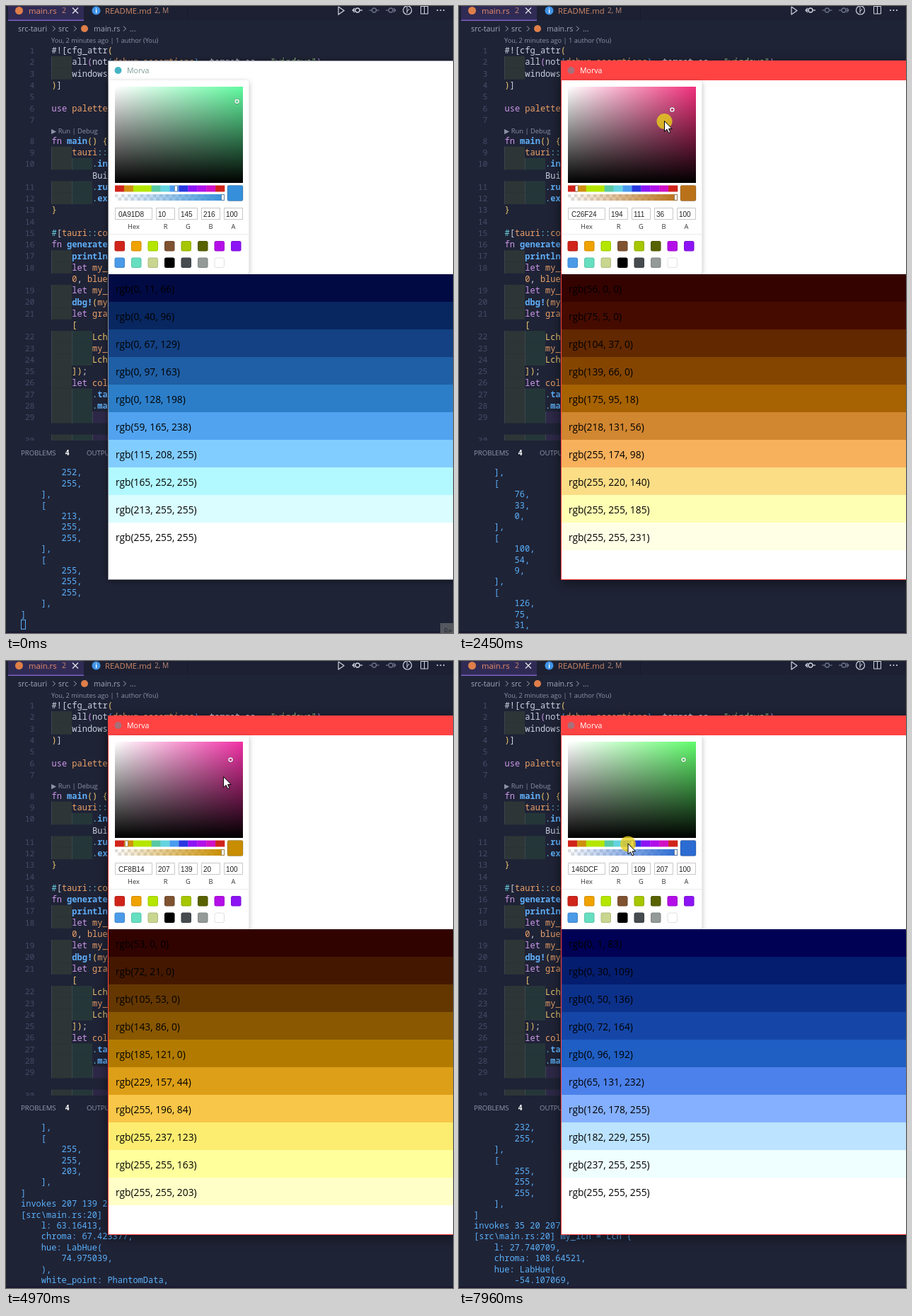
These frames come from a looping animation (632x886 px, 8000 ms). An HTML page with a canvas:

```html
<!DOCTYPE html>
<html lang="en">
<head>
<meta charset="utf-8">
<title>Colour picker demo</title>
<style>
html, body { margin: 0; width: 100%; height: 100%; overflow: hidden; background: #1f2336; }
canvas { display: block; }
</style>
</head>
<body>
<canvas id="stage" width="632" height="886"></canvas>
<script>
const ctx = document.getElementById('stage').getContext('2d');
const LOOP = 8000;
const UI = '"Open Sans", "Noto Sans", sans-serif';
const MONO = '"Noto Sans Mono", "DejaVu Sans Mono", monospace';
const ARIAL = '"Liberation Sans", Arial, sans-serif';
const BG = '#1f2336';

const BLUE = [10, 145, 216], BROWN = [139, 87, 42], ORANGE = [245, 166, 35], GOLD = [207, 139, 20];
const DARK = [99, 68, 43], SAND = [179, 126, 83], RUST = [194, 111, 36], OLIVE = [117, 91, 46];
const VIOLET = [75, 20, 207], INDIGO = [35, 20, 207], AZURE = [20, 109, 207];

// Each scene plays in hard steps, then holds. Pointer path (go) and colours are evenly spaced
// over the scene; lines = log lines printed; press = part of the scene with the button down.
const SCENES = [
  { at: 0, end: 1, steps: 1, go: [[625, 880]], colours: [BLUE], lines: 61 },
  { at: 70, end: 580, steps: 8, go: [[237, 341]], colours: [BLUE], lines: 0 },
  { at: 980, end: 1450, steps: 8, go: [[250, 232], [256, 198]], colours: [BROWN], lines: 8, press: .13, swatch: 3, busy: true },
  { at: 1600, end: 2400, steps: 12, go: [[249, 142], [285, 150], [287, 168]], colours: [DARK, SAND, BROWN, RUST], lines: 201, press: 1 },
  { at: 2450, end: 3230, steps: 12, go: [[301, 146], [301, 146], [187, 341]], colours: [RUST], lines: 96, press: .6 },
  { at: 3300, end: 4040, steps: 10, go: [[187, 341], [187, 341], [262, 190]], colours: [ORANGE], lines: 8, press: .1, swatch: 1 },
  { at: 4110, end: 4910, steps: 13, go: [[255, 178], [277, 150], [310, 139], [322, 139]],
    colours: [DARK, OLIVE, [180, 139, 66], GOLD, GOLD], lines: 172, press: 1, lag: 1.75 },
  { at: 4970, end: 5590, steps: 10, go: [[250, 262], [250, 270]], colours: [GOLD], lines: 108 },
  { at: 5860, end: 6620, steps: 11, go: [[244, 270], [242, 270]], colours: [GOLD], lines: 121, press: 1 },
  { at: 6690, end: 7360, steps: 11, go: [[290, 270], [268, 261]], colours: [GOLD], lines: 150, press: .5 },
  { at: 7560, end: 7960, steps: 6, go: [[250, 259], [239, 258]], colours: [VIOLET, INDIGO, AZURE], lines: 57, press: 1 }
];
SCENES.forEach((s, i) => {
  const last = SCENES[i - 1];
  s.path = last ? [last.go.at(-1), ...s.go] : s.go;
  s.firstLine = last ? last.firstLine + last.lines : 0;
});
const CALLS = [BLUE, BROWN, DARK, SAND, BROWN, RUST, ORANGE, OLIVE, ...Array(7).fill(GOLD), VIOLET, INDIGO];
const CALL_LINES = 61;

// Point at progress p along evenly spaced values
function along(list, p) {
  const f = Math.max(0, Math.min(1, p)) * (list.length - 1), i = Math.floor(f);
  const a = list[i], b = list[i + 1] || a;
  return a.map((x, j) => x + (b[j] - x) * (f - i));
}

function stateAt(t) {
  const scene = SCENES.findLast(s => t >= s.at);
  const { at, end, steps, lag = 0, press = 0 } = scene;
  const p = Math.min(1, (Math.floor((t - at) / (end - at) * (steps - 1) + 1e-6) + 1) / steps);
  const colourAt = q => along(scene.colours, q).map(Math.round);
  return {
    p, scene, index: SCENES.indexOf(scene),
    pointer: along(scene.path, p),
    colour: colourAt(p),
    base: colourAt(p - lag / steps),
    lines: Math.round(scene.firstLine + scene.lines * p),
    pressed: p <= press
  };
}

// Colour maths
const toLinear = c => (c /= 255) <= .04045 ? c / 12.92 : ((c + .055) / 1.055) ** 2.4;
const toByte = c => {
  const s = c <= .0031308 ? c * 12.92 : 1.055 * c ** (1 / 2.4) - .055;
  return Math.floor(Math.max(0, Math.min(1, s)) * 255 + 1e-6);
};
const labCurve = x => x > .008856 ? Math.cbrt(x) : 7.787 * x + 16 / 116;
const labInverse = x => x > .20690 ? x ** 3 : (x - 16 / 116) / 7.787;

function toLab(rgb) {
  const [r, g, b] = rgb.map(toLinear);
  const x = labCurve((.41246 * r + .35758 * g + .18044 * b) / .95047);
  const y = labCurve(.21267 * r + .71515 * g + .07218 * b);
  const z = labCurve((.01933 * r + .11919 * g + .95030 * b) / 1.08883);
  return [116 * y - 16, 500 * (x - y), 200 * (y - z)];
}

function fromLab(l, a, b) {
  const f = (l + 16) / 116;
  const x = .95047 * labInverse(f + a / 500), y = labInverse(f), z = 1.08883 * labInverse(f - b / 200);
  return [3.24045 * x - 1.53714 * y - .49853 * z,
    -.96927 * x + 1.87601 * y + .04156 * z,
    .05564 * x - .20403 * y + 1.05723 * z].map(toByte);
}

// Ten shades: lightness 0 to the colour's own, then on to 128
function shades(rgb) {
  const [l, a, b] = toLab(rgb);
  return Array.from({ length: 10 }, (_, i) => {
    const p = i / 9 * 2;
    return fromLab(p < 1 ? l * p : l + (128 - l) * (p - 1), a, b);
  });
}

function hsv([r, g, b]) {
  const max = Math.max(r, g, b), d = max - Math.min(r, g, b);
  const h = max === r ? (g - b) / d : max === g ? 2 + (b - r) / d : 4 + (r - g) / d;
  return [(h * 60 + 360) % 360, d / max, max / 255];
}
const pureHue = h => [0, 240, 120].map(o =>
  255 * Math.max(0, Math.min(1, Math.abs((h + 360 - o) % 360 - 180) / 60 - 1)));

const css = c => `rgb(${c.join(', ')})`;

// How the wide-gamut screen renders a colour
function onScreen(rgb) {
  const [r, g, b] = rgb.map(toLinear);
  return [.88 * r + .12 * g, .03 * r + .97 * g, 1.05 * b - .05 * g].map(toByte);
}

function callLog(rgb) {
  const [l, a, b] = toLab(rgb), num = x => +x.toPrecision(8);
  const out = ['invokes ' + rgb.join(' '), '[src\\main.rs:20] my_lch = Lch {',
    `    l: ${num(l)},`, `    chroma: ${num(Math.hypot(a, b))},`, '    hue: LabHue(',
    `        ${num(Math.atan2(b, a) * 180 / Math.PI)},`, '    ),', '    white_point: PhantomData,',
    '}', '[src\\main.rs:33] &colors = ['];
  for (const s of shades(rgb)) out.push('    [', ...s.map(n => `        ${n},`), '    ],');
  return out.concat(']');
}
const logLines = CALLS.flatMap(callLog);

// Drawing helpers
function rect(x, y, w, h, fill) { ctx.fillStyle = fill; ctx.fillRect(x, y, w, h); }
function text(s, x, y, font, fill, align = 'left') {
  ctx.font = font; ctx.fillStyle = fill; ctx.textAlign = align; ctx.textBaseline = 'alphabetic';
  const size = parseFloat(font.match(/[\d.]+(?=px)/)[0]);
  ctx.fillText(s, x, Math.round(y + .37 * size));
}
function disc(x, y, r, fill) { ctx.fillStyle = fill; ctx.beginPath(); ctx.arc(x, y, r, 0, 7); ctx.fill(); }
function ring(x, y, r, stroke, w) {
  ctx.strokeStyle = stroke; ctx.lineWidth = w; ctx.beginPath(); ctx.arc(x, y, r, 0, 7); ctx.stroke();
}
function line(points, stroke, w = 1) {
  ctx.strokeStyle = stroke; ctx.lineWidth = w; ctx.beginPath();
  points.forEach(([x, y]) => ctx.lineTo(x, y)); ctx.stroke();
}
function rounded(x, y, w, h, r, fill, stroke) {
  ctx.beginPath(); ctx.roundRect(x, y, w, h, r);
  if (fill) { ctx.fillStyle = fill; ctx.fill(); }
  if (stroke) { ctx.strokeStyle = stroke; ctx.lineWidth = 1; ctx.stroke(); }
}
function sweep(x0, y0, x1, y1, from, to) {
  const g = ctx.createLinearGradient(x0, y0, x1, y1);
  g.addColorStop(0, from); g.addColorStop(1, to);
  return g;
}

const INK = { w: '#ccd2e0', p: '#cc98ea', b: '#60b0fa', B: '#60b0fa', o: '#eda268', y: '#eeca70', c: '#68cede', g: '#a5d08f' };
// line number | indent | text with ~colour marks; rows without a number are wrapped
const CODE = [
  '1|0|~w#![cfg_attr~y(', '2|1|~wall~p(~wnot~b(~odebug_assertions~b)~w, target_os = ~g"windows"~p)',
  '3|1|~wwindows_subsystem', '4|0|~y)~w]', '5|0|', '6|0|~puse ~opalette', '7|0|',
  '8|0|~pfn ~Bmain~y() {', '9|1|~otauri~c::', '10|2|~c.~Binvoke', '|2|~wBuild',
  '11|2|~c.~Brun', '12|2|~c.~Bexpect', '13|0|~y}', '14|0|', '15|0|~c#~w[~otauri~c::~ocommand',
  '16|0|~pfn ~Bgenerate', '17|1|~Bprintln!', '18|1|~plet ~omy_rgb', '|1|~o0~w, ~oblue',
  '19|1|~plet ~omy_lch', '20|1|~Bdbg!~y(~omy_lch', '21|1|~plet ~ogradient', '|1|~y[',
  '22|2|~yLch', '23|2|~omy_lch', '24|2|~yLch', '25|1|~y])~w;', '26|1|~plet ~ocolors',
  '27|2|~c.~Btake', '28|2|~c.~Bmap', '29|3|', '|3|', '30|3|'
];
const SHADE = ['#2e3536', '#253639', '#2d2847'];

function drawCode() {
  text('You, 2 minutes ago | 1 author (You)', 64, 49, '9.2px ' + UI, '#8d93a8');
  text('▶ Run | Debug', 64, 176.5, '9.4px ' + UI, '#8d93a8');
  ctx.save();
  ctx.beginPath(); ctx.rect(0, 40, 632, 574); ctx.clip();
  CODE.forEach((row, i) => {
    const [num, indent, body] = row.split('|');
    const y = i < 7 ? 62.6 + i * 16.33 : 190.3 + (i - 7) * 16.28;
    for (let k = 0; num && k < +indent; k++) {
      rect(64 + k * 29, y - 8, 29, 16.4, SHADE[k]);
      rect(64 + k * 29, y - 8, 1, 16.4, '#3b4450');
    }
    text(num, 40.5, y, '11.5px ' + MONO, '#454c68', 'right');
    let x = 64.5 + indent * 28.8;
    for (const part of body.split('~').slice(1)) {
      const s = part.slice(1);
      text(s, x, y, (part[0] === 'B' ? 'bold' : '500') + ' 12px ' + MONO, INK[part[0]]);
      x += s.length * 7.2;
    }
  });
  ctx.restore();
}

function drawHeader() {
  rect(0, 0, 632, 20, '#1c2032');
  rect(3, 0, 107, 20, '#302b55');
  rect(3, 19.5, 107, 1.5, '#7d63c4');
  rect(256, 0, 1, 20, '#171a2a');
  disc(18.5, 6.5, 5.5, '#df7f49');
  text('main.rs', 32, 6.5, '11.3px ' + UI, '#e98d68');
  text('2', 79, 6.5, '10.5px ' + UI, '#c9876f');
  line([[94, 2.5], [102, 10.5]], '#e4e6ee', 1.3);
  line([[102, 2.5], [94, 10.5]], '#e4e6ee', 1.3);
  disc(127.5, 6.5, 6, '#3f93e6');
  text('i', 127.5, 6.5, 'bold 9px ' + UI, '#fff', 'center');
  text('README.md', 140, 6.5, '11.3px ' + UI, '#cd8767');
  text('2, M', 210, 6.5, '10.2px ' + UI, '#b88778');

  const icon = '#d0d4e0', dim = '#6d728a';
  line([[470, 1], [478, 6.5], [470, 12], [470, 1]], icon, 1.2);
  [icon, dim, dim].forEach((c, i) => {
    const x = 497 + i * 23.5;
    ring(x, 6, 3, c, 1.3);
    line([[x - 7, 6], [x - 3, 6]], c, 1.3);
    line([[x + 3, 6], [x + 7, 6]], c, 1.3);
    const d = i - 1;
    if (d) line([[x + 4 * d, 3], [x + 7 * d, 6], [x + 4 * d, 9]], c, 1.2);
  });
  ring(567.5, 6, 6, icon, 1.2);
  line([[567, 1], [567, 10]], icon);
  line([[567, 8], [570, 4]], icon);
  ctx.strokeRect(586.5, .5, 10, 10.5);
  line([[591.5, 0], [591.5, 11]], icon);
  for (let i = 0; i < 3; i++) disc(610 + i * 4.5, 6, 1.1, icon);

  const crumb = '10.7px ' + UI, grey = '#a3a8ba';
  text('src-tauri', 17, 32, crumb, grey);
  text('src', 74, 32, crumb, grey);
  disc(111, 32, 5, '#df7f49');
  text('main.rs', 124, 32, crumb, grey);
  text('...', 175, 32, crumb, grey);
  [66, 96, 166].forEach(x => line([[x, 28.5], [x + 3.5, 32], [x, 35.5]], grey));
}

function drawTerminal(count) {
  rect(0, 614, 632, 272, BG);
  text('PROBLEMS', 21, 631, '9.6px ' + UI, '#9299b0');
  text('4', 86.5, 631.5, 'bold 10px ' + UI, '#fff', 'center');
  text('OUTPUT', 114, 631, '9.6px ' + UI, '#9299b0');
  const idle = count % CALL_LINES === 0;
  logLines.slice(count - (idle ? 14 : 15), count).forEach((s, i) =>
    text(s, 21, 659 + i * 15.4, '500 12px ' + MONO, '#5ab0fa'));
  if (idle) {
    ctx.strokeStyle = '#5ab0fa'; ctx.lineWidth = 1;
    ctx.strokeRect(21.5, 867.5, 6, 13);
  }
  rect(0, 884, 632, 2, '#1a1730');
}

const HUES = '#d0241b #cf9010 #b4e600 #b4e600 #58c8a4 #64d4e0 #4a9bf0 #2838e0 #8c14f4 #b010e8 #d010c4 #d0241b'.split(' ');
const SWATCHES = ('#d0241b #f0a200 #b4e600 #7f5230 #a6c600 #586200 #b40ee8 #8c14f4 ' +
  '#4a9ae8 #66dfc0 #c8d690 #000000 #464b4f #939a97 #ffffff').split(' ');

function drawPicker(rgb, focus) {
  const [h, s, val] = hsv(rgb), shown = onScreen(rgb), color = css(shown);
  ctx.save();
  ctx.shadowColor = 'rgba(0,0,0,.28)'; ctx.shadowBlur = 7; ctx.shadowOffsetY = 2;
  rounded(145, 105, 198.5, 274, 4, '#fff');
  ctx.restore();

  rect(154, 114, 181, 136, sweep(154, 0, 335, 0, '#fff', css(onScreen(pureHue(h)))));
  rect(154, 114, 181, 136, sweep(0, 114, 0, 250, 'rgba(0,0,0,0)', '#000'));
  const hx = 154 + 181 * s, hy = 114 + 136 * (1 - val);
  ring(hx, hy, 3.4, 'rgba(0,0,0,.45)', 1);
  ring(hx, hy, 2.6, '#fff', 1.4);

  const cell = 155 / HUES.length;
  HUES.forEach((c, i) => rect(154 + i * cell, 253.5, cell + .3, 9, c));
  for (let x = 154; x < 309; x += 4.5)
    for (let j = 0; j < 2; j++)
      rect(x, 266 + j * 4.5, Math.min(4.5, 309 - x), 4.5, (Math.round((x - 154) / 4.5) + j) % 2 ? '#fff' : '#dedede');
  rect(154, 266, 155, 9, sweep(154, 0, 309, 0, `rgba(${shown},0)`, color));
  for (const [x, y] of [[154 + h / 360 * 155, 258], [306.5, 270.5]])
    rounded(x - 2, y - 4, 4, 8, 1, '#fff', 'rgba(0,0,0,.35)');
  rounded(313, 253.5, 22, 22, 2, color, 'rgba(0,0,0,.2)');

  const hex = rgb.map(n => n.toString(16).padStart(2, '0')).join('').toUpperCase();
  const field = (x, w, pad, value, label) => {
    ctx.strokeStyle = '#c8c8c8'; ctx.lineWidth = 1;
    ctx.strokeRect(x + .5, 285.5, w - 1, 16);
    text(value, x + pad, 294.5, '10px ' + ARIAL, '#222');
    text(label, x + w / 2, 312, '9.3px ' + UI, '#333', 'center');
  };
  field(154, 53, 5, hex, 'Hex');
  [...rgb, 100].forEach((n, i) => field(212 + i * 32, 27, 3, n, 'RGBA'[i]));
  rect(145, 322, 198, 1, '#ececec');

  SWATCHES.forEach((c, i) => {
    const x = 153.5 + i % 8 * 23.5, y = i < 8 ? 332 : 355.5;
    ctx.save();
    if (i === focus) { ctx.shadowColor = c; ctx.shadowBlur = 5; }
    rounded(x, y, 14.5, 14.5, 2.5, c);
    ctx.restore();
    rounded(x + .5, y + .5, 13.5, 13.5, 2.5, null, 'rgba(0,0,0,.12)');
  });
}

function drawWindow(s) {
  const active = s.index > 1;
  ctx.save();
  ctx.shadowColor = 'rgba(0,0,0,.5)'; ctx.shadowBlur = active ? 18 : 8; ctx.shadowOffsetY = active ? 4 : 1;
  rect(144, 77, 500, 734, active ? '#ff4343' : '#8a8f98');
  ctx.restore();
  rect(145, 78, 487, 732, '#fff');
  if (active) rect(144, 77, 488, 28, '#ff4343');
  disc(158.5, 91, 5, active ? '#a8707a' : '#45b3c4');
  text('Morva', 171, 91.5, '10.6px ' + UI, active ? '#fff' : '#7d9c97');

  drawPicker(s.colour, s.scene.swatch);
  shades(s.base).forEach((c, i) => {
    const y = 379 + i * 39;
    rect(145, y, 487, 39, css(onScreen(c)));
    text(css(c), 155, y + 20.4, '13.8px ' + UI, '#000');
  });
}

function shape(x, y, points) {
  ctx.beginPath();
  points.forEach(([dx, dy]) => ctx.lineTo(x + dx, y + dy));
  ctx.closePath();
  ctx.lineJoin = 'round';
  ctx.fillStyle = '#fff'; ctx.fill();
  ctx.strokeStyle = '#000'; ctx.lineWidth = 1; ctx.stroke();
}
const ARROW = [[0, 0], [0, 15], [3.5, 11.8], [6, 17], [8.3, 16], [6, 11], [10.6, 11]];
const FINGER = [[-1.5, 0], [1, 0], [1.8, 1.5], [1.8, 7], [8.5, 8.5], [9.5, 10], [9.2, 15], [7.5, 19.5],
  [0, 19.5], [-4.5, 13], [-4.5, 11], [-1.8, 12.5], [-1.8, 1.5]];

function drawPointer({ pointer: [x, y], p, index, scene, pressed }) {
  if (index === 0) {
    rect(614, 872, 18, 14, '#55575f');
    text('Re', 619, 883, '10px ' + UI, '#2c2e36');
    return;
  }
  if (pressed) disc(x, y + .5, 11, 'rgba(232,208,28,.8)');
  if (scene.busy && p > .2 && p < .9) ring(x + 12.5, y - .5, 5.2, '#3d8fe0', 3);
  const overSwatch = x < 344 && y > 330 && y < 372;
  shape(x, y, overSwatch ? FINGER : ARROW);
}

function frame(time) {
  const s = stateAt(time % LOOP);
  rect(0, 0, 632, 886, BG);
  drawHeader();
  drawCode();
  drawTerminal(s.lines);
  drawWindow(s);
  drawPointer(s);
}

const start = performance.now();
function tick() {
  frame(performance.now() - start);
  requestAnimationFrame(tick);
}
tick();
</script>
</body>
</html>
```
